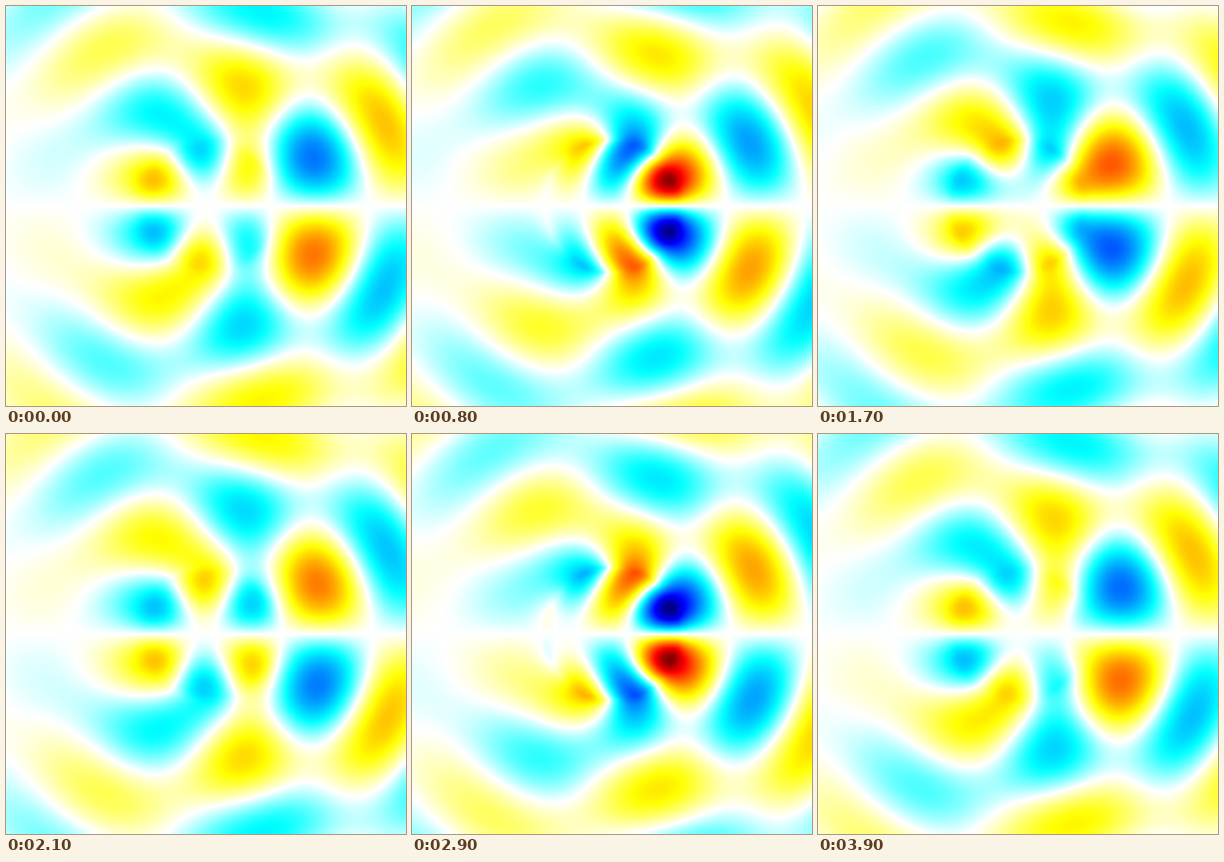
A matplotlib script that plays this animation: 400x400 px, repeating every 4 s.

```python
import numpy as np
import matplotlib.pyplot as plt
from matplotlib.animation import FuncAnimation
from matplotlib.colors import LinearSegmentedColormap

# Plane wave scattered by a dielectric cylinder of unit radius:
# the magnetic component along the direction of travel.
FRAMES, INTERVAL = 40, 100
K = np.pi            # wavenumber outside
INDEX = 1.6          # refractive index of the cylinder
ORDERS = 12
HALF = 3.0           # half width of the view, in radii
CELLS = 100


def bessel_j(z, count=50, samples=128):
    """J_0 ... J_(count-1), from the Fourier series of exp(i z sin t)."""
    t = 2 * np.pi * np.arange(samples) / samples
    waves = np.exp(1j * np.multiply.outer(z, np.sin(t)))
    series = np.fft.fft(waves, axis=-1).real / samples
    return np.moveaxis(series, -1, 0)[:count]


def hankel(z, count):
    """H_0 ... H_(count-1) of the first kind, via Neumann series."""
    j = bessel_j(z)
    log = np.log(z / 2) + np.euler_gamma
    sum0 = sum((-1) ** k * 2 / k * j[2 * k] for k in range(1, 24))
    sum1 = sum((-1) ** k * (2 * k + 1) / (k * (k + 1)) * j[2 * k + 1]
               for k in range(1, 24))
    y = [2 / np.pi * (log * j[0] - sum0),
         2 / np.pi * ((log - 1) * j[1] - j[0] / z - sum1)]
    for m in range(1, count - 1):
        y.append(2 * m / z * y[m] - y[m - 1])
    return j[:count] + 1j * np.array(y)


def slope(f, m, z):
    """Derivative of a cylinder function of order m."""
    return -f[1] if m == 0 else f[m - 1] - m / z * f[m]


def y_gradient(f, m, q, r, theta):
    """d/dy of f_m(q r) cos(m theta)."""
    return (q * slope(f, m, q * r) * np.cos(m * theta) * np.sin(theta)
            - m / r * f[m] * np.sin(m * theta) * np.cos(theta))


def field():
    axis = (np.arange(CELLS) + 0.5) / CELLS * 2 * HALF - HALF
    x, y = np.meshgrid(axis, axis)
    r, theta = np.hypot(x, y), np.arctan2(y, x)
    r_out = np.maximum(r, 1)

    q = INDEX * K
    j_in, h_out = bessel_j(q * r), hankel(K * r_out, ORDERS)
    j_k, h_k, j_q = bessel_j(K), hankel(K, ORDERS), bessel_j(q)

    inside = np.zeros_like(r, dtype=complex)
    outside = np.zeros_like(inside)
    for m in range(ORDERS):
        dj_k, dh_k = slope(j_k, m, K), slope(h_k, m, K)
        dj_q = INDEX * slope(j_q, m, q)
        b = ((dj_q * j_k[m] - j_q[m] * dj_k)
             / (j_q[m] * dh_k - dj_q * h_k[m]))
        d = (j_k[m] + b * h_k[m]) / j_q[m]
        weight = (1 if m == 0 else 2) * 1j ** m
        inside += weight * d * y_gradient(j_in, m, q, r, theta)
        outside += weight * b * y_gradient(h_out, m, K, r_out, theta)

    total = -1j * np.where(r < 1, inside, outside)
    return total / np.abs(total).max()


wave = field()

cmap = LinearSegmentedColormap.from_list("wave", [
    (0, (0, 0, 0.5)), (0.125, (0, 0, 1)), (0.375, (0, 1, 1)),
    (0.5, (1, 1, 1)),
    (0.625, (1, 1, 0)), (0.875, (1, 0, 0)), (1, (0.5, 0, 0))], N=512)

fig = plt.figure(figsize=(4, 4), dpi=100)
ax = fig.add_axes([0, 0, 1, 1])
ax.axis("off")
image = ax.imshow(wave.real, cmap=cmap, vmin=-1, vmax=1, origin="lower",
                  interpolation="bilinear", aspect="auto")


def update(i):
    image.set_data((wave * np.exp(-2j * np.pi * i / FRAMES)).real)
    return [image]


anim = FuncAnimation(fig, update, frames=FRAMES, interval=INTERVAL,
                     repeat=True, repeat_delay=0)
plt.show()
```
